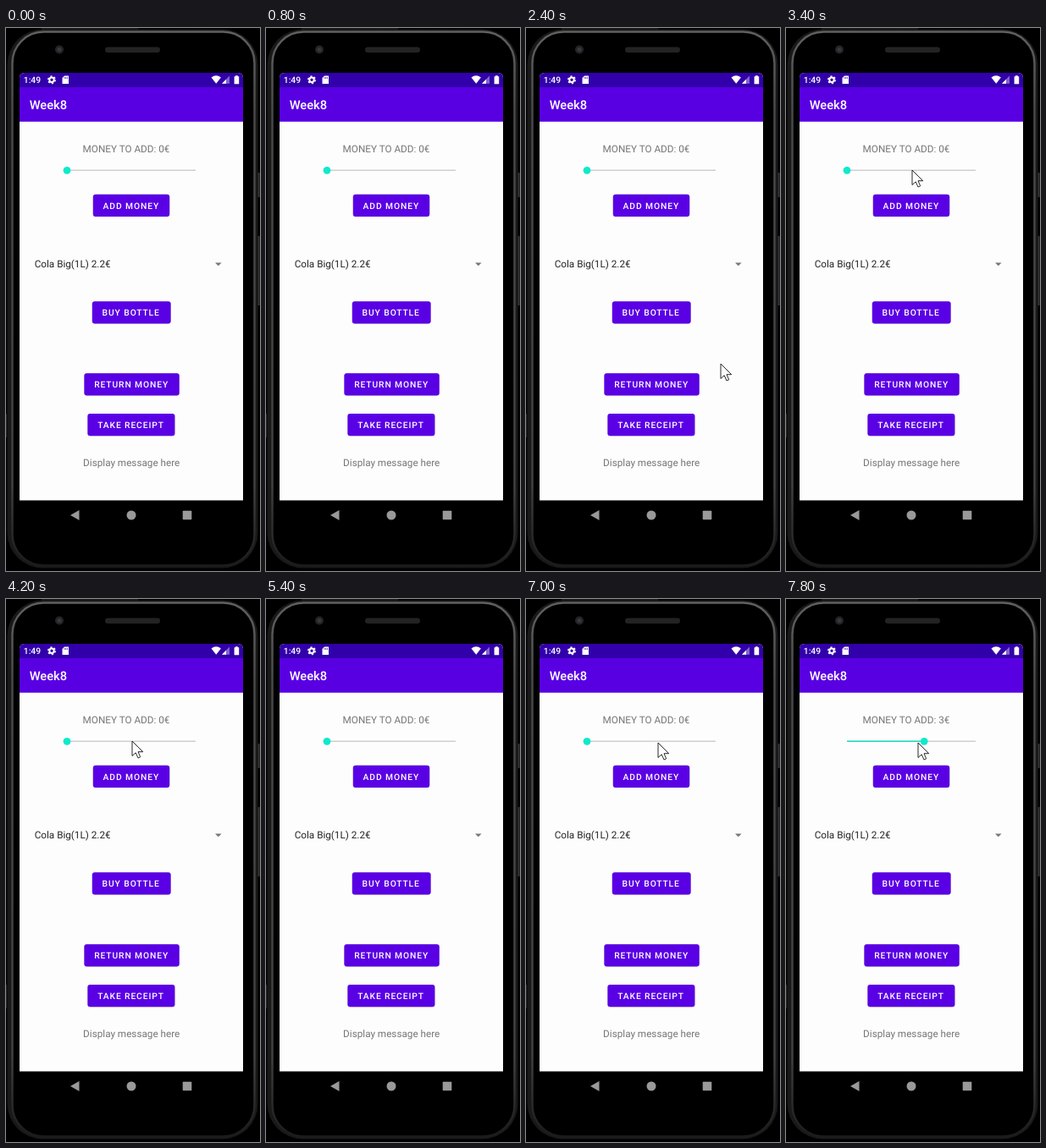
An HTML page that plays this animation: 300x642 px, repeating every 8 s.

```html
<!DOCTYPE html>
<html lang="en">
<head>
<meta charset="utf-8">
<style>
  html, body { margin: 0; width: 100%; height: 100%; overflow: hidden; background: #000; }
  svg { display: block; width: 300px; height: 642px; font: 11.73px Roboto, sans-serif; text-rendering: geometricPrecision; }
  .medium { font-weight: 500; fill: #fff; }
  .button text { font-size: 10.27px; letter-spacing: .0893em; }
  .button rect { fill: #5a00e4; filter: drop-shadow(0 .7px .7px #0004); }
  .grey { fill: #767676; }
</style>
</head>
<body>
<svg viewBox="0 0 300 642">
  <defs>
    <linearGradient id="rim" x2="0" y2="1">
      <stop offset="0" stop-color="#606060"/><stop offset=".15" stop-color="#484848"/>
      <stop offset=".85" stop-color="#404040"/><stop offset="1" stop-color="#1c1c1c"/>
    </linearGradient>
  </defs>

  <!-- Phone body -->
  <rect width="300" height="642"/>
  <path d="M298.5 171v29M298.5 246v82" stroke="#3a3a3a" stroke-width="2"/>
  <path d="M.5 456v28" stroke="#292929"/>
  <path d="M42 1H156" stroke="#333"/>
  <rect x="1.5" y="1.5" width="296" height="637" rx="42" fill="#191919"/>
  <rect x="7.5" y="4.500" width="286" height="631" rx="37" fill="#000" stroke="url(#rim)" stroke-width="2.500"/>
  <rect x="117" y="22.5" width="65" height="6.5" rx="3.2" fill="#232323"/>
  <circle cx="63" cy="25.5" r="5" fill="#242424"/>
  <circle cx="63" cy="25.5" r="2.5" fill="#343942"/>

  <!-- Screen -->
  <path d="M16 558.5V59q0-6 6-6H274q6 0 6 6V558.5z" fill="#fdfdfd"/>
  <path d="M16 110.700V70H280v40.700z" fill="#5900e3"/>
  <path d="M16 70V59q0-6 6-6H274q6 0 6 6V70z" fill="#3200aa"/>

  <!-- Status icons -->
  <text class="medium" x="20.8" y="65" font-size="10.27">1:49</text>
  <g fill="none" stroke="#fff">
    <circle cx="54" cy="61.3" r="2.7" stroke-width="2"/>
    <circle cx="54" cy="61.3" r="4.2" stroke-width="1.5" stroke-dasharray="2.2 2.198"/>
  </g>
  <g fill="#fff">
    <path d="M69 56.5h5v9.5h-7.5v-7z"/>
    <path d="M242.5 58.5q5.7-4.3 11.4 0l-5.7 7.3z"/>
    <path d="M264 56.5v9.3h-9z" opacity=".4"/>
    <path d="M260 60.7v5.1h-5z"/>
    <path d="M271 56.3h2.800v1h1.400v9h-5.600v-9h1.400z"/>
  </g>
  <path d="M69 58v2M70.7 58v2M72.4 58v2" stroke="#3200aa" stroke-width=".7"/>
  <text class="medium" x="27.7" y="96" font-size="14.67">Week8</text>

  <!-- Form -->
  <text id="amount" class="grey" x="142" y="146.8" text-anchor="middle"></text>
  <path d="M72 168.3H224" stroke="#cfcfcf" stroke-width="1.5"/>
  <path id="progress" stroke="#14dfc2" stroke-width="1.5"/>
  <circle id="thumb" cy="168.3" r="4.4" fill="#10e9ca"/>
  <g id="buttons"></g>
  <text x="33.7" y="283.4" fill="#242424">Cola Big(1L) 2.2€</text>
  <path d="M247 277.5h7.6l-3.8 3.8z" fill="#777"/>
  <text class="grey" x="148.2" y="518.4" text-anchor="middle">Display message here</text>

  <!-- Navigation -->
  <g fill="#999">
    <path d="M76 576l10.5-6v12z"/>
    <circle cx="148" cy="576" r="5.5"/>
    <rect x="208.7" y="570.7" width="10.6" height="10.6" rx=".8"/>
  </g>

  <path id="cursor" d="M0 0V17.5L4.2 13.8 7 20 9.7 18.8 7 12.7H12.7z" fill="#fff" stroke="#111" stroke-width=".9"/>
</svg>
<script>
  const byId = id => document.getElementById(id);
  const LOOP = 8000, STEP = 200;
  const SLIDER = { start: 72, length: 152, max: 5 };

  // label, left, top, width
  const buttons = [
    ['ADD MONEY', 102.8, 196.7, 90.4],
    ['BUY BOTTLE', 101.8, 323.2, 92.8],
    ['RETURN MONEY', 92.4, 408.2, 112.3],
    ['TAKE RECEIPT', 96.4, 456, 103],
  ];
  byId('buttons').innerHTML = buttons.map(([label, x, y, width]) => `
    <g class="button">
      <rect x="${x}" y="${y}" width="${width}" height="26.2" rx="3"/>
      <text class="medium" x="${x + 11.8}" y="${y + 17}">${label}</text>
    </g>`).join('');

  // Pointer visits: [time, x, y], each list ending when the pointer vanishes
  const visits = [
    [[2200, 287, 440], [2400, 230, 397], [3400, 149, 168], [5000, 149, 168]],
    [[6600, 156, 170], [8000, 156, 170]],
  ];

  function pointerAt(time) {
    const visit = visits.find(v => time >= v[0][0] && time < v.at(-1)[0]);
    if (!visit) return null;
    const next = visit.findIndex(key => key[0] > time);
    const [from, to] = [visit[next - 1], visit[next]];
    const p = (time - from[0]) / (to[0] - from[0]);
    const eased = p * p * (3 - 2 * p);
    return [1, 2].map(i => from[i] + (to[i] - from[i]) * eased);
  }

  function draw(now) {
    const time = Math.floor(now % LOOP / STEP) * STEP;
    const money = time >= 7600 ? 3 : 0;
    const thumbX = SLIDER.start + SLIDER.length * money / SLIDER.max;
    byId('amount').textContent = `MONEY TO ADD: ${money}€`;
    byId('thumb').setAttribute('cx', thumbX);
    byId('progress').setAttribute('d', `M${SLIDER.start} 168.3H${thumbX}`);

    const pointer = pointerAt(time);
    byId('cursor').setAttribute('visibility', pointer ? 'visible' : 'hidden');
    if (pointer) byId('cursor').setAttribute('transform', `translate(${pointer})`);
  }

  const start = performance.now();
  function frame() {
    draw(performance.now() - start);
    requestAnimationFrame(frame);
  }
  frame();
</script>
</body>
</html>
```
